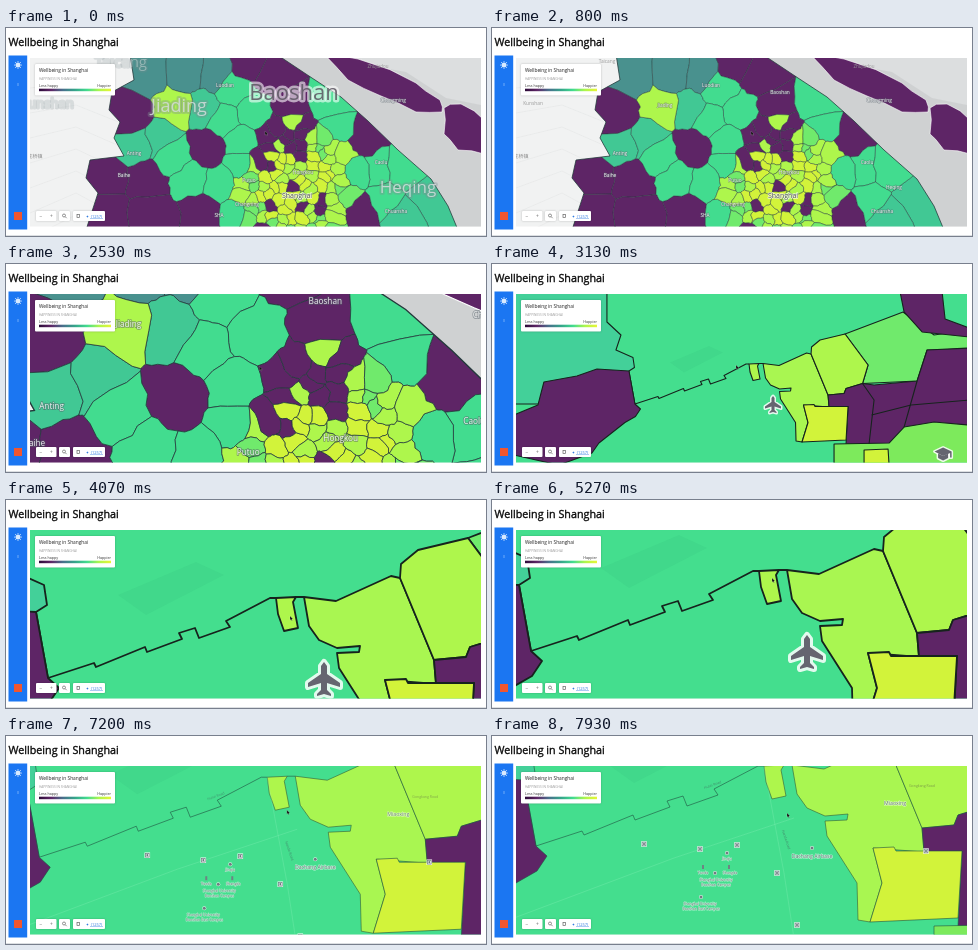
An HTML page with a canvas for the animation above (8 s loop, 480x208 px).

```html
<!DOCTYPE html>
<html lang="en">
<head>
<meta charset="utf-8">
<title>Wellbeing in Shanghai</title>
<style>
html,body{margin:0;width:100%;height:100%;overflow:hidden;background:#fff}
canvas{display:block;width:480px;height:208px}
</style>
</head>
<body>
<canvas id="stage"></canvas>
<script>
const canvas = document.getElementById('stage'), c = canvas.getContext('2d');
const dpr = window.devicePixelRatio || 1;
canvas.width = 480 * dpr;
canvas.height = 208 * dpr;

const LOOP = 8000, FONT = '"Open Sans", sans-serif';
const PURPLE = '#5e2566', TEAL = '#49918e', SEA = '#41c894', GREEN = '#42dc8f',
      MINT = '#70ea6c', LIME = '#aef64c', YELLOW = '#d2f33a';

const clamp = v => Math.max(0, Math.min(1, v));
const ramp = (v, a, b) => clamp((v - a) / (b - a));
const ease = (v, a, b) => { const f = ramp(v, a, b); return f * f * (3 - 2 * f); };
const points = s => s.split(' ').map(p => p.split(',').map(Number));
const hash = (x, y) => { const v = Math.sin(x * 12.99 + y * 78.23) * 43758.55; return v - Math.floor(v); };

// Both zooms turn about PIVOT; each pan moves the map and the pointer
const PIVOT = { x: 244, y: 102 };
const pans = [
  { from: 2200, to: 3000, map: [0, 0], mouse: [-15, -2] },
  { from: 3130, to: 3900, map: [0, 0], mouse: [40, 15] },
  { from: 4800, to: 5250, map: [-3, -27], mouse: [-4, -38] },
  { from: 5670, to: 6380, map: [-17, -18], mouse: [-14, -7] },
  { from: 6530, to: 7850, map: [22, -23], mouse: [29, 6] }
];
const travel = (t, what) => pans.reduce(([x, y], p) => {
  const f = ease(t, p.from, p.to);
  return [x + p[what][0] * f, y + p[what][1] * f];
}, [0, 0]);
function view(t) {
  const k = 2 ** (2 * ease(t, 2200, 2980) + ease(t, 3120, 3850) - 3);
  const [dx, dy] = travel(t, 'map');
  return { k, x: PIVOT.x * (1 - k) + dx, y: PIVOT.y * (1 - k) + dy };
}

function trace(pts, close = true) {
  c.beginPath();
  pts.forEach(([x, y], i) => i ? c.lineTo(x, y) : c.moveTo(x, y));
  if (close) c.closePath();
}
function shape(pts, fill, line, width) {
  trace(pts);
  c.fillStyle = fill;
  c.fill();
  if (width) { c.strokeStyle = line; c.lineWidth = width; c.stroke(); }
}
function disc(x, y, r, fill) {
  c.beginPath();
  c.arc(x, y, r, 0, 7);
  c.fillStyle = fill;
  c.fill();
}
function rect(x, y, w, h, fill) {
  c.fillStyle = fill;
  c.fillRect(x, y, w, h);
}
function text(s, x, y, size, fill, o = {}) {
  c.save();
  c.globalAlpha *= o.alpha ?? 1;
  c.font = `${size}px ${FONT}`;
  c.textAlign = o.align || 'center';
  c.translate(x, y);
  c.rotate(o.turn || 0);
  c.lineJoin = 'round';
  if (o.halo) { c.lineWidth = size * .22; c.strokeStyle = o.halo; c.strokeText(s, 0, 0); }
  c.fillStyle = fill;
  c.fillText(s, 0, 0);
  if (o.bold) { c.lineWidth = o.bold; c.strokeStyle = fill; c.strokeText(s, 0, 0); }
  c.restore();
}

// Neighbours share a jagged edge because the offset depends on its midpoint
function rough(pts, depth = 2) {
  for (; depth > 0; depth--) pts = pts.flatMap((p, i) => {
    const q = pts[(i + 1) % pts.length], mx = (p[0] + q[0]) / 2, my = (p[1] + q[1]) / 2;
    const r = Math.min(6, Math.hypot(q[0] - p[0], q[1] - p[1]) * .35);
    return [p, [mx + (hash(mx, my) - .5) * r, my + (hash(my, mx) - .5) * r]];
  });
  return pts;
}
// Part of a polygon that lies nearer to a than to b
function nearer(poly, a, b) {
  const nx = b.x - a.x, ny = b.y - a.y, mid = (nx * (a.x + b.x) + ny * (a.y + b.y)) / 2;
  const side = p => p[0] * nx + p[1] * ny - mid;
  return poly.flatMap((p, i) => {
    const q = poly[(i + 1) % poly.length], u = side(p), v = side(q), out = u <= 0 ? [p] : [];
    if (u * v < 0) out.push([p[0] + (q[0] - p[0]) * u / (u - v), p[1] + (q[1] - p[1]) * u / (u - v)]);
    return out;
  });
}

const sites = Object.entries({
  [TEAL]: '140,46 182,46 208,48',
  [PURPLE]: '124,88 242,34 268,46 286,80 358,110 201,120 100,148 142,152 100,184 146,186 196,184 352,182',
  [SEA]: '128,116 155,112 198,80 420,172 398,188',
  [GREEN]: '226,62 248,84 218,92 168,128 235,114 236,138 185,150 214,156 232,186 325,78 330,100 372,142 395,142 348,145 378,170',
  [LIME]: '170,79'
}).flatMap(([fill, s]) => points(s).map(([x, y]) => ({ x, y, fill })));

// Dense city blocks, yellow in the middle and greener outwards
for (let i = 0; i < 11; i++) for (let j = 0; j < 11; j++) {
  const x = 232 + i * 10 + hash(i, j) * 8, y = 95 + j * 10 + hash(j + 9, i) * 8, h = hash(i * 3 + 1, j * 7 + 2);
  const d = Math.hypot((x - 288) / 54, (y - 158) / 62), core = Math.hypot(x - 290, y - 115) < 16;
  if (d > 1 || (x < 262 && y < 135)) continue;
  const inner = h < .7 ? YELLOW : LIME, outer = h < .6 ? LIME : MINT;
  sites.push({ x, y, fill: core || h < .25 && x < 318 ? PURPLE : d < .68 ? inner : outer });
}
const districts = sites.map(a => {
  let cell = points('60,10 480,10 480,220 60,220');
  for (const b of sites) if (a !== b) cell = nearer(cell, a, b);
  return { fill: a.fill, pts: rough(cell.map(p => p.map(v => Math.round(v * 2) / 2))) };
});

const COAST = '270,26 306,50 335,69 362,93 392,122 425,151 442,178 452,202';
const land = points(COAST + ' 80,202 92,165 80,150 84,132 118,128 108,110 114,94 103,82 106,64 128,52 124,26');
const water = points(COAST + ' 480,202 480,26');
const islands = ['318,26 352,31 410,55 434,72 436,84 410,84 375,68 342,52', '438,80 455,76 478,92 478,126 452,122 438,106'].map(s => rough(points(s), 1));
const farShore = points('300,26 480,26 480,78 440,70 400,44');

const places = 'Jiading,173,79 Chongming,387,74 Hongkou,297,146 Putuo,243,154 Changning,241,178 Luodian,219,59 Anting,128,127 Baihe,118,149 Caolu,375,136 Chuansha,390,185 SHA,213,189 Baoshan,288,66 Heqing,402,161 Taicang,115,35 Kunshan,41,77 Shanghai,291,170'
  .split(' ').map(s => s.split(','));
const stretched = { Baoshan: 22, Jiading: 18, Heqing: 17, Taicang: 15, Kunshan: 13 };

function drawFar({ k, x, y }, t) {
  const s = 8 * k, old = 1 - ease(t, 70, 800), fade = 1 - ramp(k, .2, .42);
  c.save();
  c.translate(x - PIVOT.x * .875 * s, y - PIVOT.y * .875 * s);
  c.scale(s, s);
  c.strokeStyle = '#e4e6e6';
  c.lineWidth = .6;
  for (let i = 0; i < 7; i++) { trace([[24, 60 + i * 25], [70, 55 + i * 22], [125, 75 + i * 24]], false); c.stroke(); }
  shape(water, '#cfd1d2');
  shape(farShore, '#dcdedf');
  for (const pts of islands) shape(pts, PURPLE, '#fff', .6);
  c.save();
  trace(land);
  c.clip();
  for (const { fill, pts } of districts) shape(pts, fill, '#243a3c', .45);
  c.restore();
  c.lineWidth = .8;
  c.strokeStyle = '#243a3c';
  trace(land);
  c.stroke();
  for (const [name, px, py] of places) {
    const big = stretched[name], main = name === 'Shanghai', outside = name === 'Taicang' || name === 'Kunshan';
    text(name, +px, +py, main ? 7 : 4.8, main ? '#4c4f55' : outside ? '#999' : '#f4f5f6',
      { halo: main ? '#ffffffc0' : outside ? '' : '#55606880', alpha: fade * (big ? 1 - old : 1) });
    if (big && old) {
      const bold = name === 'Baoshan';
      text(name, +px, +py + big * .25, big, bold ? '#5a5560' : '#d5dbdc', { halo: bold ? '#ffffffb0' : '#7e8d9070', alpha: old * (outside ? .5 : .85) });
    }
  }
  text('花桥镇', 29, 130, 5, '#888', { alpha: fade });
  text('Zhujiadou', 372, 40, 4.5, '#999', { alpha: fade });
  c.restore();
}

const BORDER = '42,178 88,163 90,167 139,147 141,152 176,139 173,133 189,128 193,138 224,127 220,121 264,98 270,98';
const zones = [
  { fill: '#43d099', at: '-200,-46 -14,-46 -14,14 14,40 4,70 38,85 41,105 30,112 42,178 -200,178' },
  { fill: PURPLE, at: '-200,200 -152,180 -140,134 -74,122 -34,108 30,112 42,178 53,188 43,203 22,215 -30,256 -44,276 -110,300 -200,280' },
  { fill: LIME, at: '270,98 290,97 287,102 292,128 278,131 272,114', soon: true },
  { fill: '#a9f651', at: '298,97 330,101 385,76 394,78 428,160 430,184 379,180 388,215 376,254 364,252 363,215 333,168 331,153 353,152 354,146 331,148 313,140 303,126', soon: true },
  { fill: MINT, at: '462,38 578,-6 640,40 710,30 710,70 626,70 606,132 497,137 508,100' },
  { fill: LIME, at: '394,78 395,64 412,50 462,38 508,100 497,137 464,147 460,157 428,160' },
  { fill: PURPLE, at: '572,-46 656,-46 662,8 710,26 710,44 616,34 580,-6' },
  { fill: PURPLE, at: '428,160 460,157 464,147 497,137 520,140 606,132 626,70 710,66 710,228 584,228 550,258 464,258 468,183 430,184' },
  { fill: '#7dea5c', at: '440,258 550,256 580,224 640,214 710,220 710,300 440,300' },
  { fill: YELLOW, at: '379,180 400,179 402,183 468,183 464,250 376,254 388,215' },
  { fill: YELLOW, at: '500,270 548,268 550,300 500,300' }
].map(z => ({ ...z, pts: points(z.at) }));
const border = points(BORDER);
const streets = ['497,137 520,170 510,258', '606,132 580,224', '515,200 594,180 710,170'].map(points);
const lanes = ['270,98 290,205 303,290', '20,250 180,190 300,150'].map(points);
const runway = points('112,95 190,62 218,75 140,115');

const plane = points('0,-17 3,-13 3,-5 16,4 16,8 3,4 3,11 7,15 7,17 0,15');
const planeIcon = [...plane, ...plane.map(([x, y]) => [-x, y]).reverse()];
const capIcon = ['-10,1 0,6 10,1 10,10 0,15 -10,10', '-17,-3 0,-11 17,-3 17,9 14,9 14,0 0,6'].map(points);
function icon(parts, x, y) {
  c.save();
  c.translate(x, y);
  for (const width of [6, 0]) for (const p of parts) shape(p, '#656570', '#ffffffd8', width);
  c.restore();
}
function stop(x, y) {
  rect(x - 2.8, y - 2.8, 5.6, 5.6, '#ffffffe0');
  rect(x - 2.2, y - 2.2, 4.4, 4.4, '#69777c');
  rect(x - 1.5, y - 1.5, 3, 3, '#fff');
  rect(x - .8, y - 1.1, 1.6, 2.2, '#69777c');
}
function dot(x, y) {
  disc(x, y, 2, '#ffffffd0');
  disc(x, y, 1.5, '#717b80');
}
const stops = points('150,176 206,181 243,177 283,205 303,257 432,183');
const dots = points('318,180 233,185 221,205 207,229');

function drawLabels(t) {
  const label = (s, x, y, size = 3.6) => text(s, x, y, size, '#58706c', { halo: '#ffffffb0' });
  const fine = ease(t, 5700, 6250);
  c.globalAlpha = fine * .35;
  c.strokeStyle = '#9af0c0';
  c.lineWidth = .7;
  for (const line of lanes) { trace(line, false); c.stroke(); }
  c.globalAlpha = fine;
  stops.forEach(p => stop(...p));
  dots.forEach(p => dot(...p));
  label('Dachang Airbase', 318, 190, 5.2);
  label('Jinqiu', 233, 192);
  label('Yueda', 209, 206);
  label('Shangda', 236, 206);
  for (const x of [208, 234]) rect(x, 197, 2, 4, '#6d8583');
  text('Nanda Road', 291, 172, 3.5, '#418a6c', { turn: 1.25 });
  c.globalAlpha = ramp(t, 6600, 7300);
  label('Shanghai University', 222, 213);
  label('Baoshan Campus', 222, 218);
  label('Shanghai University', 206, 237);
  label('Baoshan East Campus', 207, 241.5);
  label('Miaoxing', 401, 137, 5.2);
  text('Hutai Road', 219, 118, 3.5, '#418a6c', { turn: -.35 });
  text('Gongkang Road', 428, 119, 3.5, '#7d9c49');
}
function drawNear({ k, x, y }, t) {
  const alpha = ramp(k, .22, .44), late = ramp(t, 6500, 7200), early = ramp(t, 5800, 6300);
  const thick = (.4 + 1.4 * k) / k;
  const outline = (f, thin) => { c.strokeStyle = f > .5 ? thin : '#16231d'; c.lineWidth = thick + (.6 - thick) * f; c.stroke(); };
  c.save();
  c.globalAlpha = alpha;
  c.translate(x, y);
  c.scale(k, k);
  c.lineJoin = 'round';
  rect(-200, -46, 910, 346, '#44de8e');
  for (const { fill, pts, soon } of zones) {
    shape(pts, fill);
    outline(soon ? early : late, soon ? '#355b35' : '#1f5140');
  }
  for (const line of [border, ...streets, [[290, 97], [298, 97]]]) { trace(line, false); outline(late, '#1f5140'); }
  shape(runway, '#1b70500f');
  if (t < 6250) {
    c.globalAlpha = alpha * (1 - ease(t, 5700, 6250));
    icon([planeIcon], 318, 179);
    icon(capIcon, 658, 276);
  }
  if (t > 5700) drawLabels(t);
  c.restore();
}

function box(x, y, w, h) {
  c.save();
  c.shadowColor = '#0004';
  c.shadowBlur = 2 * dpr;
  c.fillStyle = '#fff';
  c.beginPath();
  c.roundRect(x, y, w, h, 1);
  c.fill();
  c.restore();
}
function drawPanel() {
  const left = { align: 'left' }, blue = '#2e7ae0';
  rect(2.5, 27.5, 18.7, 174, '#1b76f2');
  for (let i = 0; i < 8; i++) disc(12 + 3.4 * Math.cos(i * Math.PI / 4), 37 + 3.4 * Math.sin(i * Math.PI / 4), .5, '#d8eaff');
  disc(12, 37, 2.5, '#d8eaff');
  rect(11.5, 55, 1, 3, '#6eaaf7');
  rect(8, 184, 8, 8, '#f0562f');

  box(29, 36, 80, 31.5);
  text('Wellbeing in Shanghai', 33, 43.5, 4.8, '#222', left);
  text('HAPPINESS IN SHANGHAI', 33, 51.5, 3.2, '#999', left);
  text('Less happy', 33, 58.5, 3.7, '#333', left);
  text('Happier', 105, 58.5, 3.7, '#333', { align: 'right' });
  const g = c.createLinearGradient(33, 0, 105, 0);
  ['#2c0a38', PURPLE, '#48708c', '#35a58a', GREEN, LIME, '#e8f536'].forEach((col, i) => g.addColorStop(i / 6, col));
  rect(33, 60.7, 72, 2.5, g);

  box(30, 183, 20.5, 10);
  box(53, 183, 11, 10);
  box(67, 183, 32, 10);
  text('−', 35, 190, 5, '#666');
  text('+', 45.5, 190, 5, '#666');
  c.strokeStyle = '#666';
  c.lineWidth = .7;
  c.beginPath();
  c.arc(58, 187.5, 1.5, 0, 7);
  c.moveTo(59.2, 188.7);
  c.lineTo(60.7, 190.2);
  c.stroke();
  c.strokeRect(71, 186.5, 2.5, 3);
  text('✦', 81.5, 190, 4, blue);
  text('(1257)', 90.5, 189.7, 4, blue);
  rect(84, 190.5, 13, .4, blue);
}

const arrow = points('-1,-2 -1,2.2 0,1.3 .8,2.8 1.4,2.5 .8,1.1 2,1');
function draw(t) {
  c.setTransform(dpr, 0, 0, dpr, 0, 0);
  rect(0, 0, 480, 208, '#fff');
  rect(0, 207, 480, 1, '#dcdfe2');
  text('Wellbeing in Shanghai', 2.5, 17.5, 10.75, '#0c0c0c', { align: 'left', bold: .35 });

  c.save();
  c.beginPath();
  c.rect(24, 30, 451, 168.5);
  c.clip();
  rect(24, 30, 451, 169, '#f1f2f2');
  const v = view(t);
  if (v.k < .5) drawFar(v, t);
  if (v.k > .22) drawNear(v, t);
  c.restore();
  drawPanel();

  const [dx, dy] = travel(t, 'mouse');
  c.save();
  c.translate(260 + dx, 105 + dy);
  shape(arrow, '#151515', '#ffffff90', .25);
  c.restore();
}

const start = performance.now();
function tick() {
  draw((performance.now() - start) % LOOP);
  requestAnimationFrame(tick);
}
tick();
</script>
</body>
</html>
```
